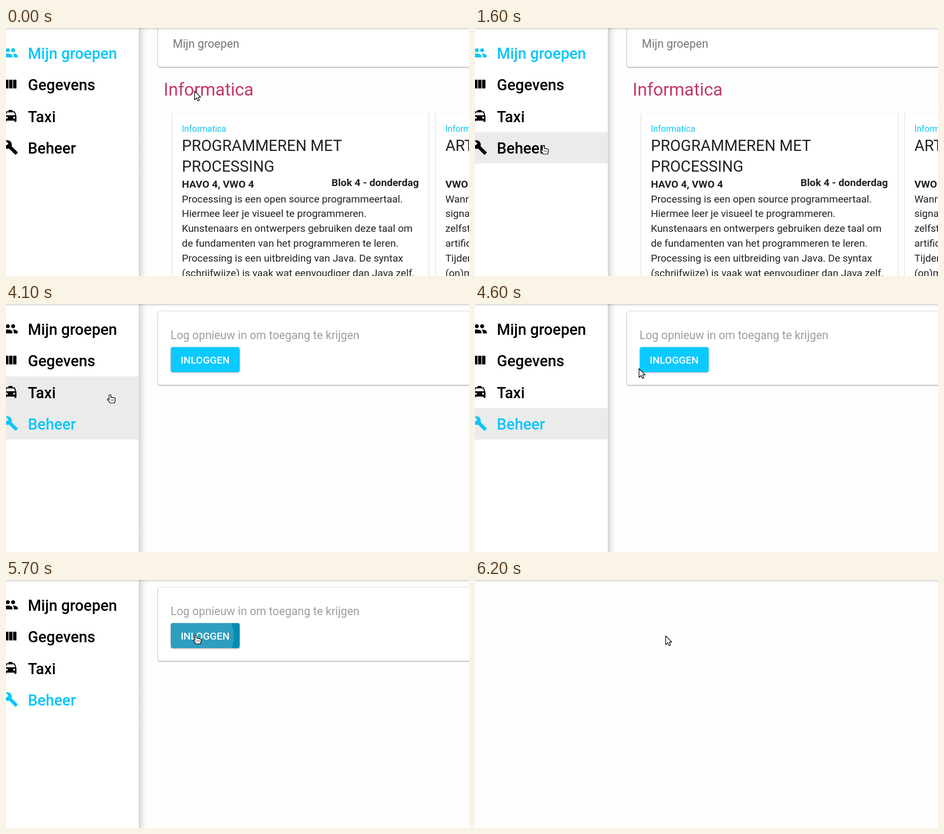
Write an HTML page that moves like this. It is 868x466 px and loops after 8000 ms.

```html
<!DOCTYPE html>
<html lang="nl">
<head>
<meta charset="utf-8">
<title>Mijn groepen</title>
<style>
html, body { margin: 0; width: 100%; height: 100%; overflow: hidden; background: #fefefe; }
svg { display: block; width: 100%; height: 100%; font-family: Roboto, sans-serif; }
text { white-space: pre; }
.menu { font-size: 28.6px; font-weight: 500; }
.panel { fill: #fff; filter: drop-shadow(0 1.5px 1px rgba(0,0,0,.32)) drop-shadow(0 .5px 1.5px rgba(0,0,0,.2)); }
.card { fill: #fff; filter: drop-shadow(0 1px 1.6px rgba(0,0,0,.25)); }
.button { filter: drop-shadow(0 1.5px 1px rgba(0,0,0,.28)) drop-shadow(0 .5px 1.5px rgba(0,0,0,.16)); }
.crumb { font-size: 21.5px; fill: #757575; }
.notice { font-size: 21.3px; fill: #9e9e9e; }
.heading { font-size: 32.8px; fill: #c2376a; }
.tag { font-size: 16.2px; fill: #0ac6f6; }
.title { font-size: 28.9px; fill: #212121; }
.meta { font-size: 19.2px; font-weight: 700; fill: #212121; }
.body { font-size: 19px; fill: #212121; }
.label { font-size: 19px; font-weight: 500; fill: #fff; text-anchor: middle; }
.end { text-anchor: end; }
</style>
</head>
<body>
<svg viewBox="0 0 868 466" xmlns="http://www.w3.org/2000/svg">
  <defs>
    <linearGradient id="side">
      <stop offset="0" stop-color="#000" stop-opacity=".17"/>
      <stop offset=".25" stop-color="#000" stop-opacity=".1"/>
      <stop offset=".6" stop-color="#000" stop-opacity=".035"/>
      <stop offset="1" stop-color="#000" stop-opacity="0"/>
    </linearGradient>
    <linearGradient id="top" x2="0" y2="1">
      <stop offset="0" stop-color="#000" stop-opacity=".2"/>
      <stop offset=".4" stop-color="#000" stop-opacity=".08"/>
      <stop offset="1" stop-color="#000" stop-opacity="0"/>
    </linearGradient>
    <clipPath id="buttonClip"><rect x="309" y="81" width="129" height="47" rx="4"/></clipPath>
  </defs>
  <rect width="868" height="466" fill="#fefefe"/>
  <g id="app">
    <g id="groups"></g>
    <g id="login">
      <rect class="panel" x="285" y="14" width="620" height="138" rx="4"/>
      <text class="notice" x="308.5" y="66">Log opnieuw in om toegang te krijgen</text>
      <rect id="button" class="button" x="309" y="81" width="129" height="47" rx="4"/>
      <circle id="ripple" cx="357" cy="105" fill="#fff" clip-path="url(#buttonClip)"/>
      <text class="label" x="373.4" y="112.2">INLOGGEN</text>
    </g>
    <rect x="249" width="16" height="466" fill="url(#side)"/>
    <rect width="249" height="466" fill="#fff"/>
    <g id="menu"></g>
  </g>
  <rect width="868" height="5" fill="url(#top)"/>
  <g id="cursor" fill="#fff" stroke="#000" stroke-linejoin="round">
    <path id="arrow" stroke-width="1.2" d="M.5.5V17L4.4 13.4 6.8 19 9.6 17.8 7.2 12.2H12Z"/>
    <g id="hand" stroke-width="1.2">
      <path d="M-1.7 9.5V1.5Q-1.7 0 0 0T1.7 1.5V5.5Q3 4.6 4.2 5.9 5.8 5 6.8 6.5 9.8 6 9.8 8.6V11.5Q9.5 13.5 8.3 14.5V16H-.5V14.8L-4.6 10Q-5.2 8.5-3.8 8.1-2.8 8.2-1.7 9.5Z"/>
      <path d="M2 9.3v2.4M4.4 9.3v2.4M6.8 9.3v2.4" stroke-width=".9"/>
    </g>
  </g>
</svg>
<script>
const LOOP = 8000, STEP = 100;
const CYAN = '#0ac6fa', ROW = 59.3, ROW_TOP = 17.4, SIDE = 249;
const $ = id => document.getElementById(id);
const text = (cls, x, y, s) => `<text class="${cls}" x="${x}" y="${y}">${s}</text>`;
const show = (el, on) => el.setAttribute('visibility', on ? 'inherit' : 'hidden');
const clamp = v => Math.max(0, Math.min(1, v));

const items = [
  ['Mijn groepen', 'M16 11c1.66 0 2.99-1.34 2.99-3S17.66 5 16 5c-1.66 0-3 1.34-3 3s1.34 3 3 3zm-8 0c1.66 0 2.99-1.34 2.99-3S9.66 5 8 5C6.34 5 5 6.34 5 8s1.34 3 3 3zm0 2c-2.33 0-7 1.17-7 3.5V19h14v-2.5c0-2.33-4.67-3.5-7-3.5zm8 0c-.29 0-.62.02-.97.05 1.16.84 1.97 1.97 1.97 3.45V19h6v-2.5c0-2.33-4.67-3.5-7-3.5z'],
  ['Gegevens', 'M10 18h5V5h-5zM4 18h5V5H4zM16 5v13h5V5z'],
  ['Taxi', 'M18.92 6.01C18.72 5.42 18.16 5 17.5 5H15V3H9v2H6.5c-.66 0-1.21.42-1.42 1.01L3 12v8c0 .55.45 1 1 1h1c.55 0 1-.45 1-1v-1h12v1c0 .55.45 1 1 1h1c.55 0 1-.45 1-1v-8zM6.5 16a1.5 1.5 0 1 1 0-3 1.5 1.5 0 0 1 0 3zm11 0a1.5 1.5 0 1 1 0-3 1.5 1.5 0 0 1 0 3zM5 11l1.5-4.5h11L19 11z'],
  ['Beheer', 'M22.7 19l-9.1-9.1c.9-2.3.4-5-1.5-6.9-2-2-5-2.4-7.4-1.3L9 6 6 9 1.6 4.7C.4 7.1.9 10.1 2.9 12.1c1.9 1.9 4.6 2.4 6.9 1.5l9.1 9.1c.4.4 1 .4 1.4 0l2.3-2.3c.5-.4.5-1.1.1-1.4z']
];
$('menu').innerHTML = items.map(([name, icon], i) => `<g transform="translate(0 ${i * ROW})">
  <rect y="${ROW_TOP}" width="${SIDE}" height="${ROW}"/>
  <g><path transform="translate(-6.5 31.8) scale(1.24)" fill-rule="evenodd" d="${icon}"/>
  ${text('menu', 41, 58, name)}</g></g>`).join('');
const rows = [...$('menu').children];

function card(x, titles, level, lines) {
  const left = x + 17.7;
  return `<rect class="card" x="${x}" y="158.5" width="480" height="400" rx="4"/>` +
    text('tag', left, 195, 'Informatica') +
    titles.map((s, i) => text('title', left, 231.3 + i * 39, s)).join('') +
    text('meta', left, 300.2, level) +
    lines.map((s, i) => text('body', left, 327.5 + i * 27.8, s)).join('');
}
$('groups').innerHTML =
  '<rect class="panel" x="285" y="-40" width="620" height="113" rx="4"/>' +
  text('crumb', 312.8, 37.3, 'Mijn groepen') +
  text('heading', 295.6, 127, 'Informatica') +
  card(312, ['PROGRAMMEREN MET', 'PROCESSING'], 'HAVO 4, VWO 4', [
    'Processing is een open source programmeertaal.',
    'Hiermee leer je visueel te programmeren.',
    'Kunstenaars en ontwerpers gebruiken deze taal om',
    'de fundamenten van het programmeren te leren.',
    'Processing is een uitbreiding van Java. De syntax',
    '(schrijfwijze) is vaak wat eenvoudiger dan Java zelf.'
  ]) + text('meta end', 774, 297.3, 'Blok 4 - donderdag') +
  card(806, ['ARTIFICIAL'], 'VWO 5', [
    'Wanneer', 'signalen', 'zelfstandig', 'artificiële', 'Tijdens', '(on)mogelijk'
  ]);

// pointer path: time, x, y
const path = [
  [200, 353, 118], [300, 346, 125], [500, 292, 178], [700, 246, 213], [800, 225, 215],
  [1000, 204, 195], [1100, 176, 190], [1200, 165, 191], [1400, 138, 212], [1600, 128, 221],
  [3600, 128, 221], [3700, 127, 216], [3900, 145, 203], [4100, 195, 170], [4300, 256, 135],
  [4500, 290, 124], [4600, 307, 121], [4700, 330, 113], [4900, 356, 104], [6100, 356, 104],
  [6200, 357, 104.5]
];
function pointer(t) {
  const i = path.findIndex(p => p[0] >= t);
  if (i < 1) return (i ? path[path.length - 1] : path[0]).slice(1);
  const [t0, x0, y0] = path[i - 1], [t1, x1, y1] = path[i];
  const k = (t - t0) / (t1 - t0);
  return [x0 + (x1 - x0) * k, y0 + (y1 - y0) * k];
}

function render(ms) {
  const t = Math.floor(ms % LOOP / STEP) * STEP;
  const [x, y] = pointer(t === 1600 ? 1600 : t > 1600 && t < 3700 ? 1600 : t);
  const admin = t >= 3700;
  const hover = x < SIDE ? Math.floor((y - ROW_TOP) / ROW) : -1;
  const onButton = admin && x > 309 && x < 438 && y > 81 && y < 128;

  show($('app'), t < 6100);
  show($('groups'), !admin);
  show($('login'), admin);
  rows.forEach((row, i) => {
    const focus = i === 3 && admin && t < 5500;
    const idle = i === 0 && !admin;
    row.children[0].setAttribute('fill', (i === hover && !idle) || focus ? '#ebebeb' : '#fff');
    row.children[1].setAttribute('fill', i === (admin ? 3 : 0) ? CYAN : '#000');
  });

  const dark = clamp((t - 4600) / 300);
  const mix = (a, b) => Math.round(a + (b - a) * dark);
  $('button').setAttribute('fill', `rgb(${mix(10, 5)},${mix(202, 139)},${mix(255, 179)})`);
  $('ripple').setAttribute('r', 90 * clamp((t - 5443) / 330));
  $('ripple').setAttribute('opacity', .16 * clamp((5900 - t) / 150));

  const hand = t < 6200 && (hover >= 0 || onButton);
  show($('hand'), hand);
  show($('arrow'), !hand);
  $('cursor').setAttribute('transform', `translate(${x} ${y})`);
}

const start = performance.now();
(function tick() {
  render(performance.now() - start);
  requestAnimationFrame(tick);
})();
</script>
</body>
</html>
```
